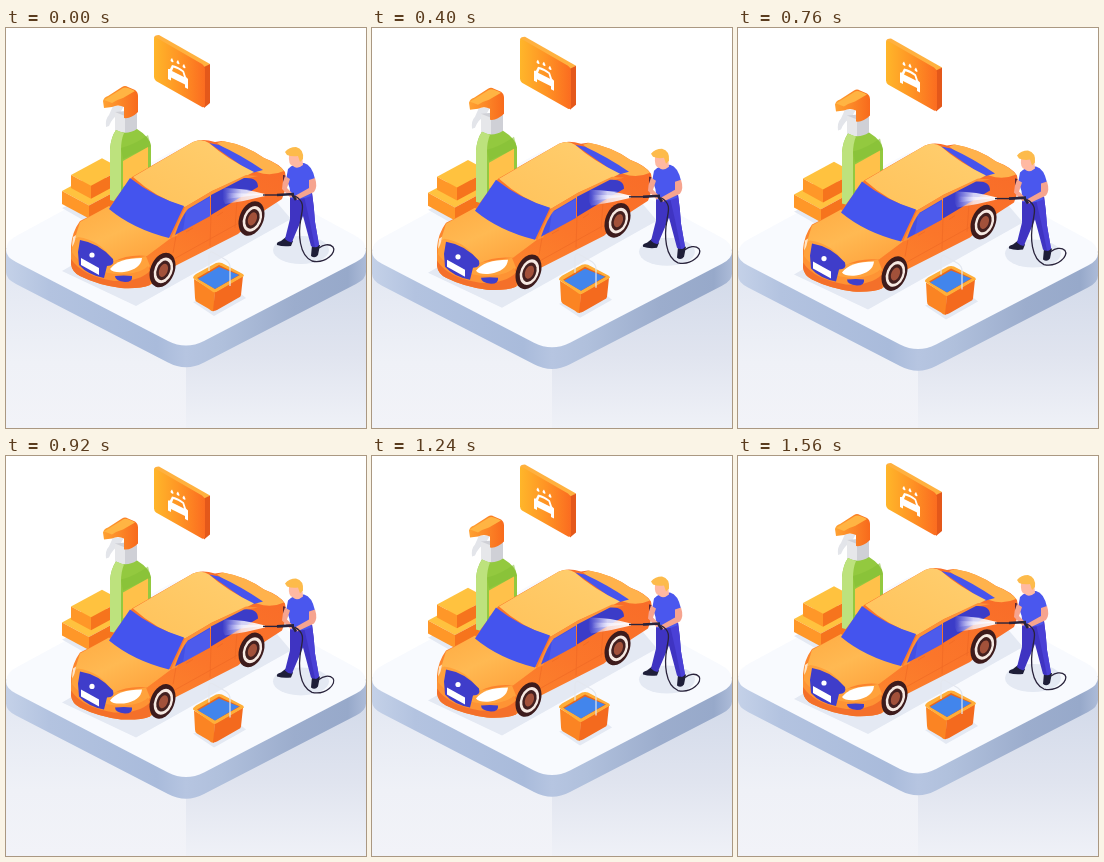
Write an HTML page that moves like this. It is 360 px wide and 400 px high and loops after 1.6 s.

```html
<!DOCTYPE html>
<html lang="en">
<head>
<meta charset="utf-8">
<title>Car wash</title>
<style>
html, body { margin: 0; width: 100%; height: 100%; overflow: hidden; background: #fff; }
svg { display: block; width: 100vw; height: 100vh; }
</style>
</head>
<body>
<svg viewBox="0 0 360 400" xmlns="http://www.w3.org/2000/svg">
<defs>
  <linearGradient id="pillarL" x1="0" y1="0" x2="0" y2="1"><stop offset="0" stop-color="#e2e7f2"/><stop offset=".6" stop-color="#eff1f7"/><stop offset="1" stop-color="#f2f3f8"/></linearGradient>
  <linearGradient id="pillarR" x1="0" y1="0" x2="0" y2="1"><stop offset="0" stop-color="#d1d9e9"/><stop offset=".55" stop-color="#e0e4ef"/><stop offset="1" stop-color="#eff1f7"/></linearGradient>
  <linearGradient id="edge"><stop offset="0" stop-color="#c4d1e8"/><stop offset=".12" stop-color="#b3c3e0"/><stop offset=".42" stop-color="#a9bbdb"/><stop offset=".5" stop-color="#b6c5e1"/><stop offset=".6" stop-color="#b0c0dc"/><stop offset=".8" stop-color="#9cadcd"/><stop offset=".95" stop-color="#97a9ca"/><stop offset="1" stop-color="#acbbd8"/></linearGradient>
  <linearGradient id="side" x1="0" y1="1" x2="1" y2="0"><stop offset="0" stop-color="#fd8f2f"/><stop offset=".5" stop-color="#fb762a"/><stop offset="1" stop-color="#f86a28"/></linearGradient>
  <linearGradient id="hood" x1="0" y1="0" x2=".8" y2="1"><stop offset="0" stop-color="#ffab42"/><stop offset=".5" stop-color="#ffb952"/><stop offset="1" stop-color="#ffa23c"/></linearGradient>
  <linearGradient id="roof" x1="0" y1="1" x2="1" y2="0"><stop offset="0" stop-color="#ffc25a"/><stop offset="1" stop-color="#ffcf70"/></linearGradient>
  <linearGradient id="sign"><stop offset="0" stop-color="#ffb62a"/><stop offset=".5" stop-color="#ff9424"/><stop offset="1" stop-color="#fb6c20"/></linearGradient>
  <linearGradient id="cap"><stop offset="0" stop-color="#ffa232"/><stop offset="1" stop-color="#f86a1c"/></linearGradient>
  <linearGradient id="mist" x1="1" x2="0"><stop offset="0" stop-color="#fff" stop-opacity=".95"/><stop offset=".55" stop-color="#f6f4ff" stop-opacity=".8"/><stop offset="1" stop-color="#dcdcff" stop-opacity="0"/></linearGradient>
</defs>

<path fill="url(#pillarL)" d="M0 236 180 325V400H0Z"/>
<path fill="url(#pillarR)" d="M360 236 180 325V400H360Z"/>

<g id="scene">
  <!-- platform -->
  <path fill="url(#edge)" d="M0 220V244Q0 251 10 256L162 334.5Q180 344 198 334.5L350 256Q360 251 360 244V220Z"/>
  <path fill="#f8fafe" d="M0 222Q0 213 12 207L165 124Q180 116 195 124L348 207Q360 213 360 222 360 229 350 234L198 313Q180 322 162 313L10 234Q0 229 0 222Z"/>
  <g fill="#e4e9f3">
    <path d="M56 243 84 227 250 150 285 191 130 278Z"/>
    <path d="M56 180 84 196 108 184 84 168Z"/>
    <path d="M187 274 208 288 240 270 230 262Z"/>
    <ellipse cx="295" cy="222" rx="28" ry="14"/>
  </g>

  <!-- sponges -->
  <g id="sponges"></g>

  <!-- spray bottle -->
  <path fill="#e3e5ea" d="M107 78 103 87Q99 91 100 99L103 98Q106 90 114 85L118 78Z"/>
  <path fill="#cfd0d6" d="M109 84 131 82V104Q120 111 109 103Z"/>
  <path fill="#e6e7ea" d="M109 84 119 88V107Q112 106 109 103Z"/>
  <path fill="url(#cap)" d="M97 73Q98 69 102 68L116 59Q119 57 122 59L129 62Q132 64 132 68V84Q125 91 118 90V79Q112 76 106 79L98 80Z"/>
  <path fill="#ffb443" d="M98 72 117 60Q120 58 129 63L117 70Q110 72 106 75Z"/>
  <path fill="#93c93f" d="M104 172V121Q105 109 110 102 120 108 131 101 144 109 145 118V160L120 175Z"/>
  <path fill="#bde27d" d="M104 172V121Q105 109 110 102L118 105Q115 112 115 122V175Z"/>
  <path fill="#84bd35" d="M115 120Q128 117 142 107L145 118 117 131Z" opacity=".55"/>
  <path fill="#ffc14a" d="M117 133 142 119V145L117 159Z"/>

  <!-- sign -->
  <path fill="#ffb13f" d="M148 10Q148 7 153 7L204 36 198 40Z"/>
  <path fill="#e4581a" d="M198 39 204 36V75L198 80Z"/>
  <path fill="url(#sign)" d="M148 11Q148 8 151 10L196 36Q199 38 199 41V77Q199 80 196 79L150 53Q148 51 148 49Z"/>
  <g transform="matrix(1 .5 0 1 172 46)" fill="#fff">
    <path fill-rule="evenodd" d="M-6-6Q0-8 6-6L8-1 10 0V10H7V7H-7V10H-10V0L-8-1ZM-4.5-4.2-6 0H6L4.5-4.2Q0-5.4-4.5-4.2Z"/>
    <path id="drop" d="M-6-13Q-3-9-6-9-9-9-6-13Z"/>
    <use href="#drop" x="6" y="-1"/><use href="#drop" x="12"/>
  </g>

  <!-- car -->
  <path fill="url(#side)" d="M65 218Q66 204 74 193L104 178 126 149 187 114Q196 110 209 114L216 113Q240 117 258 130 274 136 279 144L281 157 276 171 259 182 232 206 169 238 144 257Q134 261 115 260 92 257 74 248 66 244 65 236Z"/>
  <path fill="url(#hood)" d="M74 194 103 178Q121 193 165 210 153 219 141 228 122 226 107 234 93 213 69 210Z"/>
  <path fill="#ffa23c" d="M66 213 72 209Q95 212 107 233L140 228 144 238Q138 247 112 250 83 245 66 226Z"/>
  <path fill="#ffb24c" d="M211 115 217 113Q240 117 258 130 273 136 278 143 265 149 251 144Z"/>
  <path fill="#4654ed" d="M203 115 213 117Q235 127 257 142L246 145Z"/>
  <path fill="url(#roof)" d="M127 149 187 114Q196 110 203 115 221 131 248 144L240 148 206 163 179 179Q150 170 127 149Z"/>
  <path fill="#4454ee" d="M103 181 124 150Q148 169 178 178 171 193 163 210 127 201 103 181Z"/>
  <path fill="#fd9238" d="M165 210 179 179 206 163 240 147 252 148 242 150 207 168 183 182 171 208Z"/>
  <path fill="#4350e4" d="M169 207Q175 189 182 181L204 168V188Z"/>
  <path fill="#5563f2" d="M180 183 204 169V188L177 203Z" opacity=".6"/>
  <path fill="#3b3cc8" d="M205 167 238 150Q252 149 252 159L230 172 205 187Z"/>
  <g fill="none" stroke="#ea6423" stroke-width=".8" opacity=".6">
    <path d="M170 208 167 225M205 187 204 218M231 173 229 200"/>
    <path d="M168 231 231 196M180 204 187 200M211 188 217 184"/>
  </g>
  <path fill="#f4702a" d="M65 227Q76 245 108 250 132 252 144 240V257Q134 261 115 260 92 257 74 248 66 244 65 236Z"/>
  <path fill="#fe9334" d="M65 223Q77 242 109 246 133 247 142 238L144 243Q133 254 108 253 76 248 65 231Z"/>
  <path fill="#3f3dca" d="M74 212Q93 215 107 231 109 238 101 238L98 250Q82 247 73 237L72 224Z"/>
  <path fill="#fff" d="M75 230 93 240V247L75 237Z"/>
  <circle cx="86" cy="227" r="2.6" fill="#fff"/>
  <path fill="#fff" d="M104 241Q112 230 136 230 135 241 118 244 107 245 104 241Z"/>
  <path fill="#ffe5c6" d="M67 209 70 207Q69 215 66 219Z"/>
  <path fill="#3f3fcb" d="M109 248Q118 247 126 248 127 254 119 254 109 253 109 248Z"/>
  <path fill="#5d2630" d="M277 147Q281 146 280 154L277 159Z"/>
  <g id="wheels"></g>
  <path fill="url(#mist)" d="M259 166Q238 160 218 160 214 168 219 176 240 173 259 168Z"/>
  <path fill="url(#mist)" d="M259 166 220 165V171Z"/>

  <!-- bucket -->
  <path fill="#fb8423" d="M188 251 209 264 208 283Q206 284 203 281L191 274Q189 273 189 270Z"/>
  <path fill="#f46a1e" d="M209 264 237 248 235 267Q235 269 232 270L211 282Q209 283 207 283Z"/>
  <path fill="#ffae38" d="M187 250Q187 248 190 246L210 235Q213 234 216 235L235 245Q238 246 238 248L212 263Q209 265 207 264Z"/>
  <path fill="#e9651c" d="M191 250 213 237 234 247 209 261Z"/>
  <path fill="#4285ec" d="M192 251 213 239 233 247 209 261Z"/>
  <path fill="none" stroke="#e3e7ef" stroke-width="1.2" d="M203 243V227Q204 222 208 225L220 232Q224 235 224 239V258"/>

  <!-- washer -->
  <path fill="#1e1e38" d="M280 209 287 213 285 218Q277 219 271 217 270 214 275 213ZM306 217 314 217 312 227Q309 231 305 228Z"/>
  <path fill="#3f34c2" d="M284 168 306 165Q308 178 309 194L313 217Q309 221 305 218L297 188 286 214Q283 215 279 211L284 191Z"/>
  <path fill="#4a40d6" d="M298 168 306 165Q308 178 309 194L313 217Q311 220 309 219L303 190Z"/>
  <path fill="#4a57ee" d="M282 141Q287 135 298 135 306 137 309 151L304 154 305 168Q294 173 284 170 285 158 280 152Z"/>
  <path fill="#f6a48f" d="M303 152 309 150Q312 159 308 164L291 172 287 169 303 160Z"/>
  <path fill="#f6a48f" d="M279 148 284 151 281 160 288 167 285 170 276 161Q276 155 279 148Z"/>
  <path fill="#ffb9a2" d="M283 127H296L297 137Q291 142 287 138 282 137 283 127Z"/>
  <path fill="#fdbb4b" d="M279 124Q283 119 290 119 298 121 297 131L294 134 292 128Q286 129 281 127Z"/>
  <g fill="none" stroke="#29233b">
    <path stroke-width="1.3" d="M289 168C300 174 296 182 295 190 292 206 293 227 306 233 320 236 331 224 327 219 323 215 317 217 313 220"/>
    <path d="M257 167 277 167" stroke-width="1.4"/>
    <path d="M271 167 288 166M286 166 290 172" stroke-width="2.6"/>
  </g>
</g>
</svg>
<script>
const LOOP = 1600, STEP = 40, RISE = 3.6;
const $ = id => document.getElementById(id);
const face = (fill, ...pts) => `<polygon fill="${fill}" points="${pts.join(' ')}"/>`;

// Isometric block from its left corner: w runs down right, l runs up right.
function block(x, y, w, l, h) {
  const k = 0.54;
  const a = [x, y], b = [x + w, y + w * k], c = [x + w + l, y + (w - l) * k], d = [x + l, y - l * k];
  const low = ([px, py]) => [px, py + h];
  return face('#ffc23f', a, b, c, d) + face('#ff9728', a, b, low(b), low(a)) +
    face('#f6741d', b, c, low(c), low(b));
}

function wheel(x, y) {
  const ring = (rx, ry, fill, dx = 0) => `<ellipse cx="${dx}" rx="${rx}" ry="${ry}" fill="${fill}"/>`;
  return `<g transform="translate(${x} ${y}) rotate(22)">` + ring(12, 18, '#3d1b1c') +
    ring(9, 13.4, '#f6e9e2', 1) + ring(6.6, 10.2, '#43201f', 1) + ring(4.2, 6.8, '#a2513a', 1) + '</g>';
}

$('sponges').innerHTML = block(56, 163, 27, 34, 13) + block(65, 147, 20, 31, 13);
$('wheels').innerHTML = wheel(245.5, 190.5) + wheel(156.5, 242);

function draw(now) {
  const t = Math.floor(now % LOOP / STEP) * STEP;
  const y = RISE * (1 - Math.cos(2 * Math.PI * t / LOOP)) / 2;
  $('scene').setAttribute('transform', `translate(0 ${y.toFixed(3)})`);
}

const start = performance.now();
function tick() {
  draw(performance.now() - start);
  requestAnimationFrame(tick);
}
tick();
</script>
</body>
</html>
```
